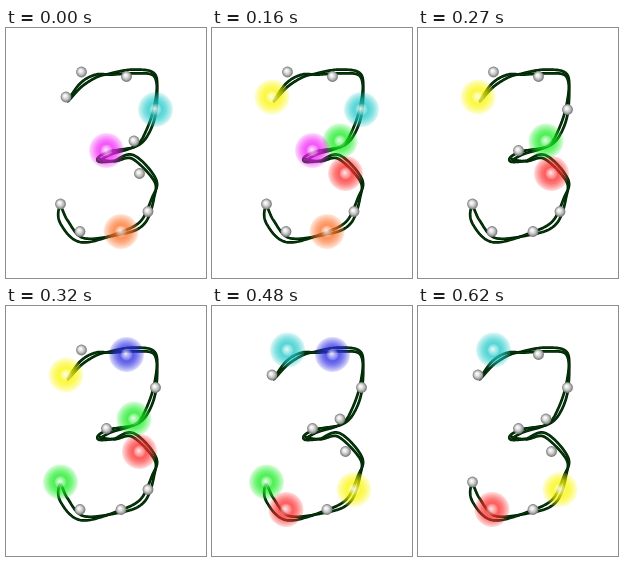
Recreate the animation shown at these times as an HTML page with a canvas. Size 200 px wide and 250 px high, loop 0.68 s.

```html
<!DOCTYPE html>
<html lang="en">
<head>
<meta charset="utf-8">
<title>Light string 3</title>
<style>
html, body { margin: 0; width: 100%; height: 100%; overflow: hidden; background: #fff; }
canvas { display: block; width: 200px; height: 250px; }
</style>
</head>
<body>
<canvas id="stage" width="200" height="250"></canvas>
<script>
const ctx = document.getElementById("stage").getContext("2d");
const LOOP = 680, STEP = 160, LIT = 200, HALF_TWISTS = 7;

const YELLOW = "250,246,0", CYAN = "30,200,200", GREEN = "20,236,30",
  MAGENTA = "242,30,246", RED = "252,40,40", ORANGE = "252,112,40", BLUE = "40,40,228";

// x, y, colour, group; the groups light up one after another
const bulbs = [
  [60, 69, YELLOW, 1], [75.5, 44, CYAN, 3], [120.5, 48.5, BLUE, 2],
  [149.5, 81.5, CYAN, 0], [128, 113, GREEN, 1], [100.5, 122.5, MAGENTA, 0],
  [133.5, 145.5, RED, 1], [142, 183.5, YELLOW, 3], [115, 203.5, ORANGE, 0],
  [74, 203.5, RED, 3], [54.5, 176, GREEN, 2]
];

// Key points along the middle of the twisted cable
const spine = [
  [62, 73], [75, 57], [90, 48], [105, 46], [128, 43.5], [149, 48], [149.5, 78],
  [142, 103], [130, 118], [104, 125], [93, 132], [108, 133], [127, 129], [149, 152],
  [147, 170], [136, 195], [112, 206], [76, 212], [58, 194], [54, 178]
];
const LAST = spine.length - 1;

function spinePoint(u) {
  const i = Math.min(Math.floor(u), LAST - 1), t = u - i;
  const at = k => spine[Math.max(0, Math.min(LAST, k))];
  return [0, 1].map(n => {
    const [a, b, c, d] = [at(i - 1)[n], at(i)[n], at(i + 1)[n], at(i + 2)[n]];
    return b + t / 2 * (c - a + t * (2 * a - 5 * b + 4 * c - d + t * (3 * (b - c) + d - a)));
  });
}

// One wire swings from side to side of the spine; the far end opens into a loop
function wire(side) {
  const path = new Path2D();
  for (let u = 0; u <= LAST; u += 0.05) {
    const [x, y] = spinePoint(u);
    const [x0, y0] = spinePoint(Math.max(0, u - 0.02));
    const [x1, y1] = spinePoint(Math.min(LAST, u + 0.02));
    const len = Math.hypot(x1 - x0, y1 - y0) || 1;
    const f = u / LAST;
    const off = side * (1.9 + 4 * f ** 10) * Math.sin(Math.PI * HALF_TWISTS * f);
    path.lineTo(x - off * (y1 - y0) / len, y + off * (x1 - x0) / len);
  }
  return path;
}
const wires = [wire(1), wire(-1)];

function drawWire(path) {
  ctx.lineCap = ctx.lineJoin = "round";
  ctx.lineWidth = 2.7;
  ctx.strokeStyle = "#001a04";
  ctx.stroke(path);
  ctx.lineWidth = 1.3;
  ctx.strokeStyle = "#003c06";
  ctx.stroke(path);
}

function disc(x, y, r, stops, fx = x, fy = y) {
  const g = ctx.createRadialGradient(fx, fy, 0, x, y, r);
  for (const [at, colour] of stops) g.addColorStop(at, colour);
  ctx.fillStyle = g;
  ctx.beginPath();
  ctx.arc(x, y, r, 0, Math.PI * 2);
  ctx.fill();
}

function drawBulb(x, y) {
  disc(x, y, 5.4, [[0, "#fff"], [0.3, "#ececec"], [0.65, "#bcbcbc"], [0.9, "#858585"], [1, "#747474"]],
    x - 1.3, y - 1.5);
}

function drawGlow(x, y, rgb) {
  const c = a => `rgba(${rgb},${a})`;
  disc(x, y, 17.5, [[0, c(0.7)], [0.4, c(0.75)], [0.6, c(0.62)], [0.8, c(0.4)], [1, c(0.14)]]);
  disc(x, y, 6, [[0, "rgba(255,255,255,0.85)"], [0.45, "rgba(255,255,255,0.5)"], [1, "rgba(255,255,255,0.1)"]],
    x - 1, y - 1);
}

function draw(t) {
  ctx.fillStyle = "#fff";
  ctx.fillRect(0, 0, 200, 250);
  wires.forEach(drawWire);
  const isLit = ([, , , group]) => t >= group * STEP && t < group * STEP + LIT;
  for (const b of bulbs) if (!isLit(b)) drawBulb(b[0], b[1]);
  for (const b of bulbs) if (isLit(b)) drawGlow(b[0], b[1], b[2]);
}

const start = performance.now();
function tick() {
  draw((performance.now() - start) % LOOP);
  requestAnimationFrame(tick);
}
tick();
</script>
</body>
</html>
```
